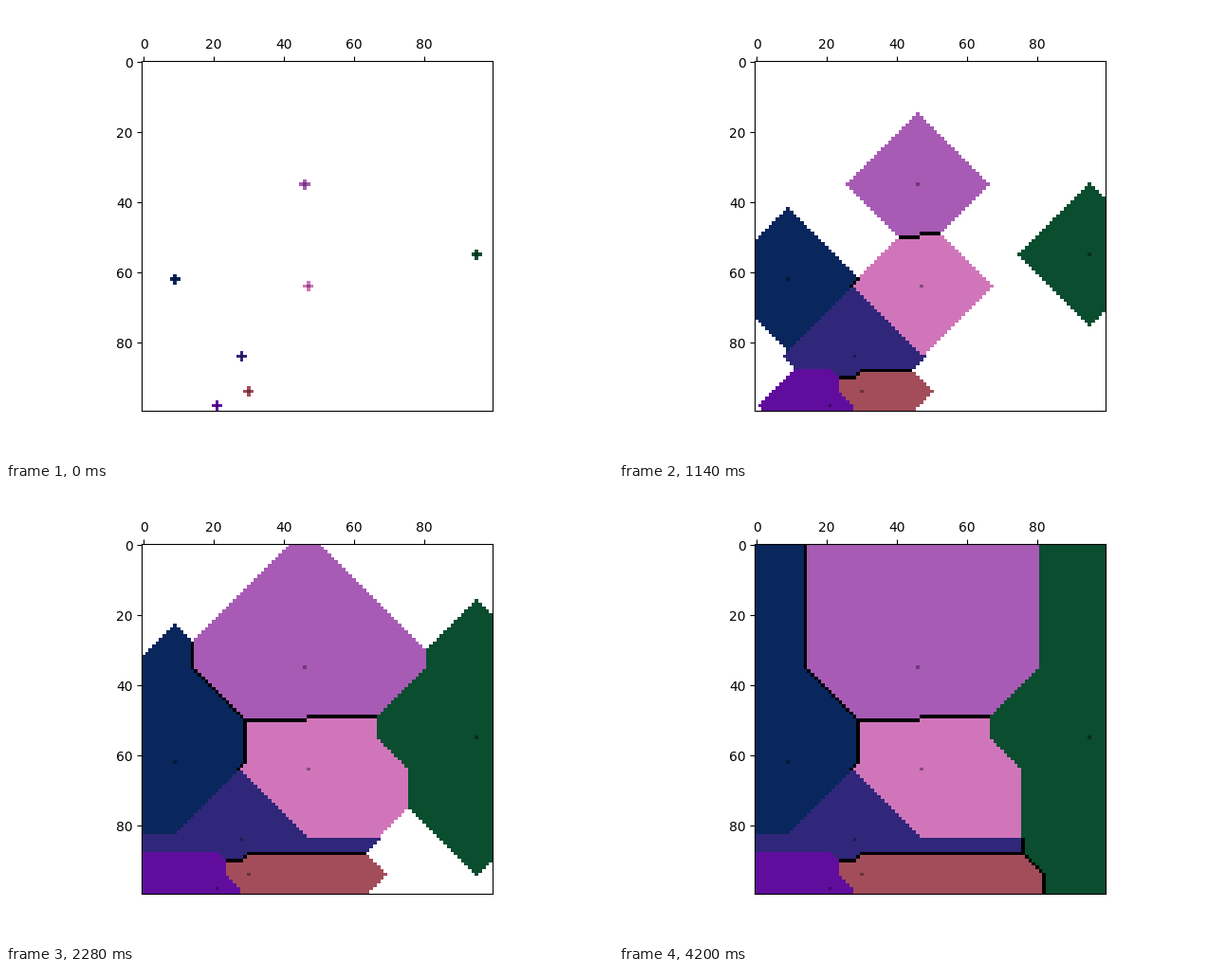
A matplotlib script that plays this animation: 640x480 px, repeating every 6 s.

```python
import matplotlib.pyplot as plt
import numpy as np
from matplotlib.animation import FuncAnimation
from matplotlib.colors import to_rgb

SIZE = 100
FRAMES = 100
INTERVAL = 60
SEED_SHADE = 0.65

# Each cell colour grows from one seed at (x, y).
SEEDS = {
    "#a85bb5": (46, 35),
    "#d175ba": (47, 64),
    "#0a4d2f": (95, 55),
    "#09265d": (9, 62),
    "#30277a": (28, 84),
    "#a34d5a": (30, 94),
    "#600d9e": (21, 98),
}


def build_diagram():
    """Return the finished Manhattan Voronoi picture and each pixel's distance."""
    rows, cols = np.mgrid[:SIZE, :SIZE]
    distances = np.array([abs(cols - x) + abs(rows - y) for x, y in SEEDS.values()])
    nearest = distances.min(axis=0)
    colors = np.array([to_rgb(color) for color in SEEDS])

    picture = colors[distances.argmin(axis=0)]
    picture[(distances == nearest).sum(axis=0) > 1] = 0  # equidistant: border
    picture[nearest == 0] *= SEED_SHADE
    return picture, nearest


picture, nearest = build_diagram()


def grown(radius):
    return np.where((nearest <= radius)[..., None], picture, 1.0)


fig, ax = plt.subplots(figsize=(6.4, 4.8), dpi=100)
image = ax.imshow(grown(1), interpolation="nearest")
ax.xaxis.tick_top()


def update(frame):
    image.set_data(grown(frame + 1))
    return [image]


anim = FuncAnimation(fig, update, frames=FRAMES, interval=INTERVAL,
                     repeat=True, repeat_delay=0)
plt.show()
```
